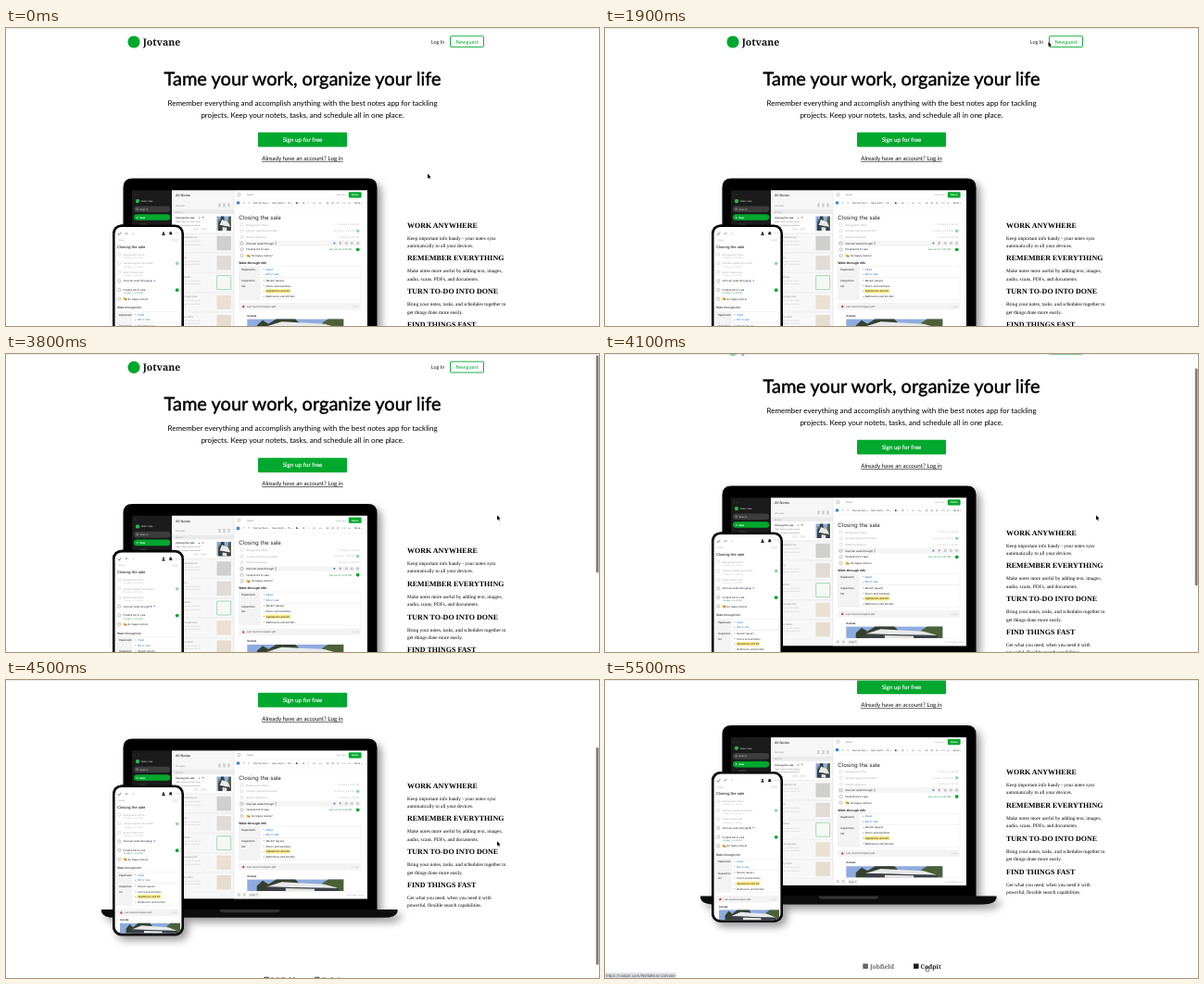
An HTML page that plays this animation: 640 px wide and 322 px high, repeating every 5.9 s.

```html
<!DOCTYPE html>
<html lang="en">
<head>
<meta charset="utf-8">
<title>Jotvane</title>
<style>
html, body { margin: 0; width: 100%; height: 100%; overflow: hidden; background: #fff; }
svg { display: block; width: 100%; height: 100%; }
text { font-family: Lato, sans-serif; text-rendering: geometricPrecision; white-space: pre; }
.ui { font-family: Inter, sans-serif; }
.times { font-family: "Liberation Serif", serif; }
.brand { font-family: "Noto Serif", serif; font-weight: 700; }
.stat { font-family: Roboto, sans-serif; }
.b { font-weight: 700; }
.m { font-weight: 500; }
.mid { text-anchor: middle; }
.end { text-anchor: end; }
#link text { text-decoration: underline; }
#login.on text, #link.on text { fill: #00a82d; }
#demo.on rect { fill: #00a82d; }
#demo.on text { fill: #fff; }
#sign.on rect { fill: #008f26; }
#job.on *, #code.on * { fill: #1c1c1c; }
</style>
</head>
<body>
<svg id="stage" viewBox="0 0 640 322" xmlns="http://www.w3.org/2000/svg"></svg>
<script>
const LOOP = 5900, STEP = 100, GREEN = '#00a82d';

const T = (x, y, size, str, color = '#222', cls = 'ui', more = '') =>
  `<text x="${x}" y="${y}" font-size="${size}" fill="${color}" class="${cls}" ${more}>${str}</text>`;
const R = (x, y, w, h, color, r = 0, more = '') =>
  `<rect x="${x}" y="${y}" width="${w}" height="${h}" rx="${r}" fill="${color}" ${more}/>`;
const C = (x, y, r, color, more = '') => `<circle cx="${x}" cy="${y}" r="${r}" fill="${color}" ${more}/>`;
const P = (d, color, more = '') => `<path d="${d}" fill="${color}" ${more}/>`;
const L = (d, color, w = .45) => P(d, 'none', `stroke="${color}" stroke-width="${w}"`);
const G = (id, inner) => `<g id="${id}">${inner}</g>`;
const ring = (x, y, r = 1.6, c = '#999') => C(x, y, r, 'none', `stroke="${c}" stroke-width=".45"`);

function hero() {
  return C(138, 15, 6.6, GREEN)
    + T(147.7, 18.6, 10.5, 'Jotvane', '#111', 'brand')
    + G('login', T(458.8, 16.6, 5.45, 'Log In', '#222', ''))
    + G('demo', R(479.5, 8.8, 36, 11.8, '#fff', .8, `stroke="${GREEN}" stroke-width=".9"`)
      + T(497.5, 16.6, 5.45, 'Newguest', GREEN, 'mid'))
    + T(320, 61.6, 20, 'Tame your work, organize your life', '#000', 'mid', 'stroke="#000" stroke-width=".45"')
    + T(320, 83.6, 8, 'Remember everything and accomplish anything with the best notes app for tackling', '#000', 'mid')
    + T(320, 97, 8, 'projects. Keep your notets, tasks, and schedule all in one place.', '#000', 'mid')
    + G('sign', R(272, 112.8, 96, 15.8, GREEN, 1)
      + T(320, 123.1, 6.35, 'Sign up for free', '#fff', 'mid', 'stroke="#fff" stroke-width=".15"'))
    + G('link', T(320, 142.9, 6.25, 'Already have an account? Log in', '#111', 'mid'));
}

function features() {
  return [
    ['WORK ANYWHERE', 'Keep important info handy - your notes sync', 'automatically to all your devices.'],
    ['REMEMBER EVERYTHING', 'Make notes more useful by adding text, images,', 'audio, scans, PDFs, and documents.'],
    ['TURN TO-DO INTO DONE', 'Bring your notes, tasks, and schedules together to', 'get things done more easily.'],
    ['FIND THINGS FAST', 'Get what you need, when you need it with', 'powerful, flexible search capabilities.']
  ].map(([head, a, b], i) => {
    const y = 215.5 + 35.85 * i;
    return T(433, y, 8, head, '#000', 'times b') + T(433, y + 13, 5.37, a, '#000', 'times')
      + T(433, y + 21.4, 5.37, b, '#000', 'times');
  }).join('');
}

function footer() {
  const item = (id, x, name) => G(id, R(x, 419.8, 5.6, 5.6, '#666', .4) + T(x + 7.6, 425.2, 6.6, name, '#666', 'brand'));
  return item('job', 278.3, 'Jobfield') + item('code', 333, 'Codpit');
}

// A house under a blue sky, in flat shapes
function house(x, y, w, h) {
  const poly = (color, ...pts) => P('M' + pts.map(([a, b]) => `${x + a * w} ${y + b * h}`).join('L') + 'Z', color);
  return R(x, y, w, h, '#8fabdf')
    + poly('#35402f', [.1, .55], [.16, .1], [.22, .4], [.3, 0], [.5, 0], [.55, .4], [.55, 1], [.1, 1])
    + poly('#4d6138', [.78, .3], [.84, 0], [1, 0], [1, 1], [.78, 1])
    + poly('#e8eaea', [.2, .62], [.36, .22], [.8, .4], [.95, .75])
    + poly('#3b4048', [.2, .62], [.95, .75], [.95, 1], [.2, 1])
    + poly('#e4e4e0', [.4, .75], [.7, .8], [.7, 1], [.4, 1]);
}

function table(x, y, w, col, rows, fs, gap) {
  let s = '', top = y;
  for (const [label, lines] of rows) {
    const h = lines.length * gap + .6;
    s += R(x, top, w, h, '#fff', 0, 'stroke="#e2e2e2" stroke-width=".35"') + R(x, top, col, h, '#f3f3f3');
    label.forEach((l, i) => s += T(x + 3, top + 4.4 + i * gap, fs, l, '#333', 'ui m'));
    lines.forEach((l, i) => {
      const ly = top + 4 + i * gap, link = lines.length === 2;
      if (l.startsWith('Appl')) s += R(x + col + 5, ly - 3.3, fs * 9.5, 4.4, '#fdec8b');
      s += C(x + col + 3.4, ly - 1, .45, '#333') + T(x + col + 6, ly, fs, l, link ? '#1a6fd0' : '#222');
    });
    top += h;
  }
  return s;
}
const INFO = [[['Paperwork'], ['Deed', 'Bill of sale']],
  [['Inspection', 'list'], ['Recent repairs', 'Doors and windows', 'Appliances and AC', 'Bathrooms and kitchen']]];
const TASKS = ['Reorganize office', 'Upload signed document', 'Submit appraisal',
  'One last walk-through', 'Finalize bill of sale', 'So happy dance!'];

const flag = (x, y, c) => P(`M${x} ${y - 1.4}l1.8 .7-1.8 .8z`, c);
const emoji = (x, y) => C(x, y, 1.6, '#f2b632') + C(x + 1.5, y + .6, .9, '#b5562b');
const pdf = (x, y, w, fs) => R(x, y, w, 7.4, '#f3f3f3', .8)
  + P(`M${x + 3.4} ${y + 5}l1.5-3 1.5 3z`, '#d8333c') + T(x + 8.5, y + 4.9, fs, 'Last round of repairs.pdf', '#444')
  + T(x + w - 3, y + 4.8, 2.1, '3.4 MB', '#bbb', 'ui end');

function sidebar() {
  return R(136, 175.3, 43, 160, '#1b1b1b')
    + T(139, 181, 3, '‹  ›', '#777')
    + C(142, 187, 2.2, '#2bb24c') + T(146, 188, 2.5, 'Robin Vale', '#ddd')
    + R(138, 192.4, 39.2, 6.7, '#3d3d3d', 3.3) + ring(141.6, 195.6, 1, '#ccc') + T(144.5, 196.8, 2.7, 'Search', '#ccc')
    + R(138, 201.2, 39.2, 6.6, GREEN, 3.3) + T(140.6, 205.7, 3.6, '+', '#fff', 'ui b') + T(144.5, 205.5, 2.7, 'New', '#fff', 'ui b')
    + T(144.5, 212.6, 2.7, 'Home', '#777');
}

function noteList() {
  let s = R(179, 175.3, 67, 160, '#f6f6f6')
    + T(183, 182.2, 3.7, 'All Notes', '#333', 'ui m') + T(183, 192.6, 2.5, '32 notes', '#888')
    + [230.5, 235.5, 240.5].map(x => L(`M${x - 1.4} 190.2h2.8M${x - .8} 191.5h1.6M${x - 1.2} 192.8h2.4`, '#777')).join('')
    + R(179, 196.2, 67, 4.6, '#ebebeb') + T(183, 199.5, 2.1, 'RECENT', '#999');
  const names = ['Closing the sale', 'Client preferences', 'Programs', 'Flight details', 'Walk-through plan', 'Property notes'];
  const tones = ['', '#cfcfcd', '#e0dbd7', '#f4f8f5', '#ecdfd3', '#e6dccf'];
  names.forEach((n, i) => {
    const y = 201.7 + 21.3 * i;
    s += R(179.3, y - .8, 66.4, 20.6, i ? '#f7f7f7' : '#fff', 0, 'stroke="#e4e4e4" stroke-width=".35"');
    const row = T(183, y + 4.3, 2.7, n, '#222', 'ui m')
      + T(183, y + 8.4, 2.2, 'Open house on the 2nd at', '#777') + T(183, y + 11.8, 2.2, 'noon, bring the new forms', '#777')
      + T(183, y + 16.8, 2.1, 'Yesterday', '#999');
    if (i) s += `<g opacity=".42">${row}</g>` + R(227.5, y + 1.8, 15.4, 15.4, tones[i], .5);
    else s += row + C(208.5, y + 3.4, .7, '#2a7de1') + flag(212, y + 3.5, '#d8333c') + house(227.5, y + 1.8, 15.4, 15.4)
      + R(202, y + 14, 6, 3, '#eee', 1) + R(210, y + 14, 7, 3, '#eee', 1);
    if (i === 3) s += R(227.7, y + 2, 15, 15, 'none', .5, 'stroke="#58b87a" stroke-width=".5"');
  });
  return s;
}

function editor() {
  let s = R(246, 175.3, 144, 160, '#fff') + R(245.8, 175.3, .4, 160, '#ddd')
    + R(250, 178.7, 2.8, 2.8, 'none', .3, 'stroke="#888" stroke-width=".45"') + T(258.5, 181.3, 2.8, '▫ Sales', '#888')
    + T(366.5, 181.2, 2.5, 'Only you', '#999', 'ui end')
    + R(369.8, 177.2, 13.8, 6.2, GREEN, .8) + T(376.7, 181.3, 2.7, 'Share', '#fff', 'ui b mid') + T(386, 181, 3, '⋯', '#555')
    + R(246, 184.6, 144, .3, '#eee')
    + C(250.5, 189, 1.8, '#1a6fd0') + T(250.5, 190, 2.8, '+', '#fff', 'ui b mid');
  const tools = [[255.5, '↶'], [261, '↷'], [267, 'Normal Text ⌄'], [287, 'Sans Serif ⌄'], [304, '15 ⌄'], [312.5, '●⌄'],
    [320.5, 'B'], [326, 'I'], [331.5, 'U'], [338, '≡⌄'], [346, '☰'], [351.5, '☰'], [357, '☑'], [362.5, '⊂⊃'], [369, '≡⌄'], [376, 'More ⌄']];
  s += tools.map(([x, t]) => T(x, 190, 2.6, t, '#444')).join('') + R(246, 193.8, 144, .3, '#e8e8e8')
    + T(251.3, 207.1, 6.05, 'Closing the sale', '#222');
  TASKS.forEach((t, i) => {
    const y = 212.5 + 6.7 * i, open = i > 2;
    if (i === 3) s += R(251, y - 3.1, 132, 6.2, '#f5f5f5', .6);
    s += ring(254.6, y, 1.6, open ? '#777' : '#bbb');
    if (i === 5) s += emoji(261, y);
    s += T(i === 5 ? 265 : 259.2, y + 1.05, 2.85, t, open ? '#222' : '#aaa');
    if (!open) s += T(i === 1 ? 376 : 381, y + .9, 2.4, 'Thu May 3, 3:30 PM', '#bbb', 'ui end');
  });
  s += C(379.7, 219.2, 1.8, '#8fd6a4') + C(379.7, 239.3, 1.9, GREEN)
    + T(373, 240.2, 2.5, 'Sat Jun 23, 3:30 PM', '#26883f', 'ui end')
    + L('M291 230.6v3.8', '#222', .4)
    + C(354.4, 232.5, 1, '#2a7de1') + flag(360.4, 232.7, '#d8333c') + L('M360.4 231.3v3', '#d8333c', .4)
    + [367.3, 373.3, 379.6].map(x => ring(x, 232.5, 1.1, '#777')).join('');
  return s + T(251.3, 255, 3.4, 'Walk-through info', '#222', 'ui b')
    + table(251.3, 257.6, 131.7, 23.5, INFO, 2.85, 5.8)
    + pdf(251.3, 297, 131.7, 2.7)
    + T(260.3, 311.6, 2.6, 'Outside', '#222', 'ui b')
    + house(260.3, 314.6, 104, 12.6)
    + R(246, 327, 144, 8.3, '#fff') + R(246, 327, 144, .3, '#e4e4e4')
    + ring(251.2, 331, 1.2, '#777') + ring(257.3, 331, 1.2, '#777')
    + R(261.5, 328.9, 12, 4.4, '#eee', 2) + T(267.5, 332, 2.4, 'Help ↑', '#555', 'ui mid')
    + T(386, 332, 2.2, 'All changes saved', '#aaa', 'ui end');
}

const LAPTOP = P('M126.5 348V172.300q0-9.800 9.800-9.800H390.700q9.800 0 9.800 9.800V348z', '#050505')
  + P('M103 347H422.5V349.5Q421 355.8 408 355.8H117.5Q104.5 355.8 103 349.5z', '#0b0b0b');
const PHONE = R(115, 212.4, 77, 162.8, '#050505', 9.5);

function laptop() {
  return `<g filter="url(#drop)">${LAPTOP + PHONE}</g>`
    + sidebar() + noteList() + editor()
    + P('M230.5 347h65q-.5 3.2-4 3.2h-57q-3.5 0-4-3.2z', '#333');
}

function phone() {
  let s = PHONE + R(117.6, 215, 71.800, 157.6, '#fff', 7)
    + L('M120.7 222.3l1.3 1.3 2.3-2.8', '#222', .6)
    + T(128.5, 223.6, 4, '↶', '#444') + T(135.5, 223.6, 4, '↷', '#bbb')
    + C(170, 221.2, 1, '#222') + P('M168.2 224a1.8 1.9 0 0 1 3.6 0z', '#222')
    + P('M175.7 223.3q.8-.8.8-2a1.2 1.2 0 0 1 2.4 0q0 1.2.8 2z', '#222')
    + T(185, 223.4, 4, '⋯', '#333', 'ui mid')
    + T(120.3, 230, 2.4, '▫ Sales', '#999') + R(179, 227.5, 7, 3.2, '#eee', 1)
    + T(120, 237.8, 4, 'Closing the sale', '#222', 'ui m');
  TASKS.forEach((t, i) => {
    const y = 244.6 + 9.6 * i, open = i > 2;
    s += ring(122.3, y, 1.6, open ? '#777' : '#bbb');
    if (i === 5) s += emoji(128, y);
    s += T(i === 5 ? 131.5 : 126.5, y + 1, 2.75, t, open ? '#222' : '#aaa');
    if (i < 3 || i === 4) s += T(126.5, y + 4.3, 2.2, 'Thu May 3, 3:30 PM', open ? '#26883f' : '#bbb');
  });
  return s + C(184.7, 254.4, 1.8, '#8fd6a4') + C(184.7, 283.2, 1.9, GREEN)
    + C(156.5, 273.4, .9, '#2a7de1') + flag(159.6, 273.6, '#d8333c')
    + T(120, 303.4, 3.05, 'Walk-through info', '#222', 'ui m')
    + table(119, 306.5, 68.5, 17.5, INFO, 2.7, 5.8)
    + pdf(119.5, 346.5, 68, 2.5)
    + T(123, 359, 2.5, 'Outside', '#222', 'ui b')
    + `<g clip-path="url(#glass)">${house(123, 361.8, 65, 11)}</g>`;
}

const stage = document.getElementById('stage');
stage.innerHTML = `<defs>
    <filter id="drop" x="-10%" y="-10%" width="120%" height="130%">
      <feDropShadow dx="4.5" dy="5" stdDeviation="4.5" flood-color="#000" flood-opacity=".4"/></filter>
    <clipPath id="glass">${R(117.6, 215, 71.8, 157.6, '#fff', 7)}</clipPath></defs>`
  + R(0, 0, 640, 322, '#fff')
  + G('page', hero() + laptop() + phone() + features() + footer())
  + R(0, 0, 640, .6, '#dcdcdc')
  + G('bar', R(636.8, 1, 2.8, 235, '#7d7d7d', 1.4))
  + G('status', R(-2, 316.3, 45, 8, '#dfe1e5', 1) + T(1, 320.9, 4.4, '', '#555', 'stat'))
  + G('arrow', P('M0 0V4.9L1.2 3.9 2 5.6 2.9 5.2 2.1 3.5H3.6Z', '#000', 'stroke="#fff" stroke-width=".6" paint-order="stroke"'))
  + G('hand', P('M-.4 .2Q0-.5.4.2V2Q2.4 1.7 2.5 3.2 2.4 4.9 1.7 5.5H-.4L-1.9 3.3Q-1.7 2.5-.4 3.3Z', '#fff', 'stroke="#111" stroke-width=".55"'));

const $ = id => document.getElementById(id);
const [page, bar, status, arrow, hand] = ['page', 'bar', 'status', 'arrow', 'hand'].map($);
const [tipBox, tipText] = status.children;

// Hover zones in page coordinates: id, x, y, width, height, address
const ZONES = [
  ['login', 457, 10, 18, 10, 'localhost:3000/login'],
  ['demo', 479, 8, 37, 13, ''],
  ['sign', 272, 113, 96, 16, 'localhost:3000/signup'],
  ['link', 277, 137, 86, 8, 'localhost:3000/login'],
  ['job', 278, 417, 35, 10, 'https://jobfield.com/in/nella-brun'],
  ['code', 333, 417, 30, 10, 'https://codpit.com/NellaBrun/Jotvane']
];
// time, x, y
const POINTER = [[0, 455, 157.6], [600, 455, 157.6], [700, 456.8, 157.4], [1000, 456.8, 157.4], [1100, 457.8, 157],
  [1200, 457.8, 157], [1700, 467, 16], [1800, 467, 15], [2000, 490, 15], [2100, 492, 15], [2400, 336, 120],
  [2500, 335, 126], [2600, 333, 139.5], [2700, 333, 139.5], [3100, 530, 174.3], [4700, 530, 174.3],
  [5200, 300, 307], [5300, 299, 308.5], [5500, 347.5, 309.5]];
const SCROLL = [[0, 0], [3600, 0], [3800, .6], [4000, 5], [4100, 20], [4300, 69], [4400, 86], [4500, 99],
  [4600, 108.5], [4700, 114.4], [4900, 113.4]];

function at(keys, t, k) {
  const i = keys.findIndex(p => p[0] > t);
  if (i < 0) return keys[keys.length - 1][k];
  const a = keys[i - 1], b = keys[i];
  return a[k] + (b[k] - a[k]) * (t - a[0]) / (b[0] - a[0]);
}

function draw(t) {
  const x = at(POINTER, t, 1), y = at(POINTER, t, 2), top = at(SCROLL, t, 1);
  page.setAttribute('transform', `translate(0 ${-top})`);
  bar.setAttribute('transform', `translate(0 ${top * .725})`);
  bar.style.display = t >= 3600 && t < 5200 ? '' : 'none';

  let hit = null;
  for (const z of ZONES) {
    const [id, zx, zy, w, h] = z;
    const on = x >= zx && x <= zx + w && y + top >= zy && y + top <= zy + h;
    $(id).classList.toggle('on', on);
    if (on) hit = z;
  }
  const url = hit ? hit[5] : '';
  status.style.display = url ? '' : 'none';
  tipText.textContent = url;
  if (url) tipBox.setAttribute('width', tipText.getComputedTextLength() + 4.5);

  arrow.style.display = hit ? 'none' : '';
  hand.style.display = hit ? '' : 'none';
  (hit ? hand : arrow).setAttribute('transform', `translate(${x} ${y})`);
}

let start = null;
function tick(now) {
  if (start === null) start = now;
  draw(Math.floor((now - start) % LOOP / STEP) * STEP);
  requestAnimationFrame(tick);
}
draw(0);
requestAnimationFrame(tick);
</script>
</body>
</html>
```
